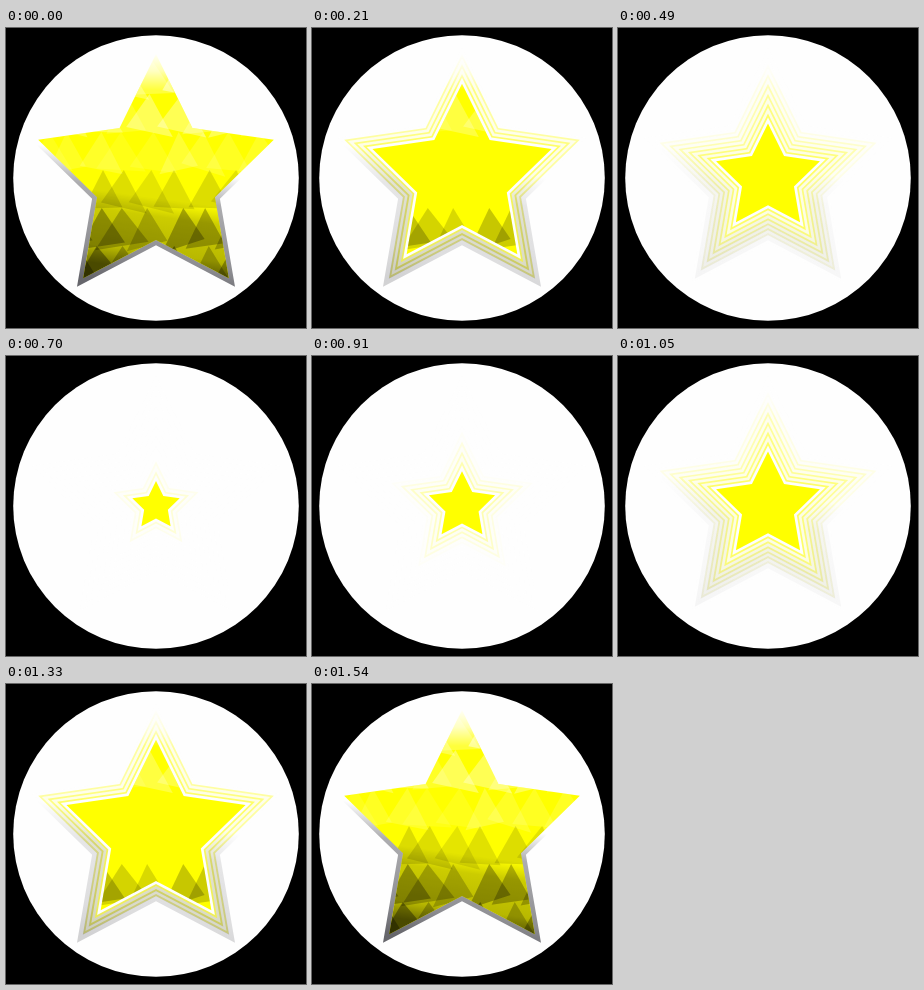
An HTML page with a canvas for the animation above (1610 ms loop, 300 px wide and 300 px high).

```html
<!DOCTYPE html>
<html lang="en">
<head>
<meta charset="utf-8">
<title>Pulsing star</title>
<style>
  html, body { margin: 0; width: 100%; height: 100%; overflow: hidden; background: #000; }
  canvas { display: block; width: 300px; height: 300px; }
</style>
</head>
<body>
<canvas id="stage" width="300" height="300"></canvas>
<script>
const ctx = document.getElementById('stage').getContext('2d');
const STEP = 70, STEPS = 23, PEAK = 11;
const CENTER = 150, RIM = 10.5, GAP = 6;
const PAPER = '#fefefe';

const clamp = (v, lo = 0, hi = 1) => Math.min(hi, Math.max(lo, v));
const radius = level => 15 + 9.9 * level;
const hash = n => {
  const s = Math.sin(n * 127.1 + 31.7) * 43758.5453;
  return s - Math.floor(s);
};

// Gradient running down the stage, optionally leaning to the left.
function ramp(top, bottom, lean, colors) {
  const g = ctx.createLinearGradient(CENTER, top, CENTER - lean, bottom);
  colors.forEach((color, i) => g.addColorStop(i / (colors.length - 1), color));
  return g;
}

const yellow = ramp(24, 62, 0, ['#fff', '#ffffb0', '#ff0']);
const rimShade = ramp(136, 258, 20,
  ['rgba(0,0,10,0)', 'rgba(0,0,10,.32)', 'rgba(0,0,10,.38)', 'rgba(0,0,10,.44)', 'rgba(0,0,10,.6)']);
const dusk = ramp(170, 242, 10,
  ['rgba(0,0,0,0)', 'rgba(0,0,0,.2)', 'rgba(0,0,0,.24)', 'rgba(0,0,0,.28)', 'rgba(0,0,0,.55)']);

function polygon(points) {
  ctx.beginPath();
  points.forEach(([x, y]) => ctx.lineTo(x, y));
  ctx.closePath();
}

function starPath(r) {
  polygon(Array.from({ length: 10 }, (_, i) => {
    const a = i * Math.PI / 5 - Math.PI / 2;
    const d = i % 2 ? r / 2 : r;
    return [CENTER + d * Math.cos(a), CENTER + d * Math.sin(a)];
  }));
}

function fillStar(r, paint, alpha = 1) {
  starPath(r);
  ctx.globalAlpha = alpha;
  ctx.fillStyle = paint;
  ctx.fill();
  ctx.globalAlpha = 1;
}

// Rows of overlapping peaks: white above the middle, black below it.
function peaks(level) {
  const rowHeight = 38, spacing = 27;
  for (let row = 0; row < 6; row++) {
    const lasting = row % 3 === 1;
    const fade = lasting ? clamp((level - 5) / 4) : clamp((level - 8) / 3);
    const y = 28 + row * rowHeight;
    const depth = y - 127;
    const tone = Math.sign(depth) * 0.08 + depth / 380;
    for (let col = 0; col < 9; col++) {
      const id = row * 20 + col;
      const x = 40 + col * spacing + (hash(id) - 0.5) * 14;
      const half = 19 + hash(id + 200) * 8;
      const tilt = (hash(id + 300) - 0.5) * 14;
      polygon([[x, y], [x + half, y + rowHeight + tilt], [x - half, y + rowHeight - tilt]]);
      const shade = Math.abs(tone) * (0.6 + 0.8 * hash(id + 400)) * fade;
      ctx.fillStyle = depth > 0 ? `rgba(0,0,0,${shade})` : `rgba(255,255,255,${shade})`;
      ctx.fill();
    }
  }
}

function solidStar(level) {
  const r = radius(level), full = clamp((level - 8) / 3);
  fillStar(r + GAP, PAPER, 1 - full);
  fillStar(r + RIM, rimShade, full);
  fillStar(r, yellow);
  ctx.save();
  starPath(r);
  ctx.clip();
  fillStar(r, dusk, full);
  peaks(level);
  ctx.restore();
}

// Older, larger stars linger as pale rings with a soft shadow at their feet.
function echoes(level) {
  const life = Math.min(7, 1.5 + 1.4 * level);
  const strength = Math.min(0.85, 0.1 + 0.19 * level);
  for (let e = PEAK; e > level; e--) {
    const alpha = strength * clamp(1 - (e - level) / life);
    const r = radius(e);
    fillStar(r + GAP, PAPER, 0.8);
    fillStar(r + RIM, rimShade, alpha * clamp((e - 5) / 6) * 0.6);
    fillStar(r, yellow, alpha * 0.75);
  }
}

function draw(level) {
  ctx.fillStyle = '#000';
  ctx.fillRect(0, 0, 300, 300);
  ctx.fillStyle = PAPER;
  ctx.beginPath();
  ctx.arc(CENTER, CENTER, 142.8, 0, Math.PI * 2);
  ctx.fill();
  echoes(level);
  solidStar(level);
}

function tick(now) {
  const step = Math.floor(now / STEP) % STEPS;
  draw(Math.abs(PEAK - step));
  requestAnimationFrame(tick);
}
draw(PEAK);
requestAnimationFrame(tick);
</script>
</body>
</html>
```
